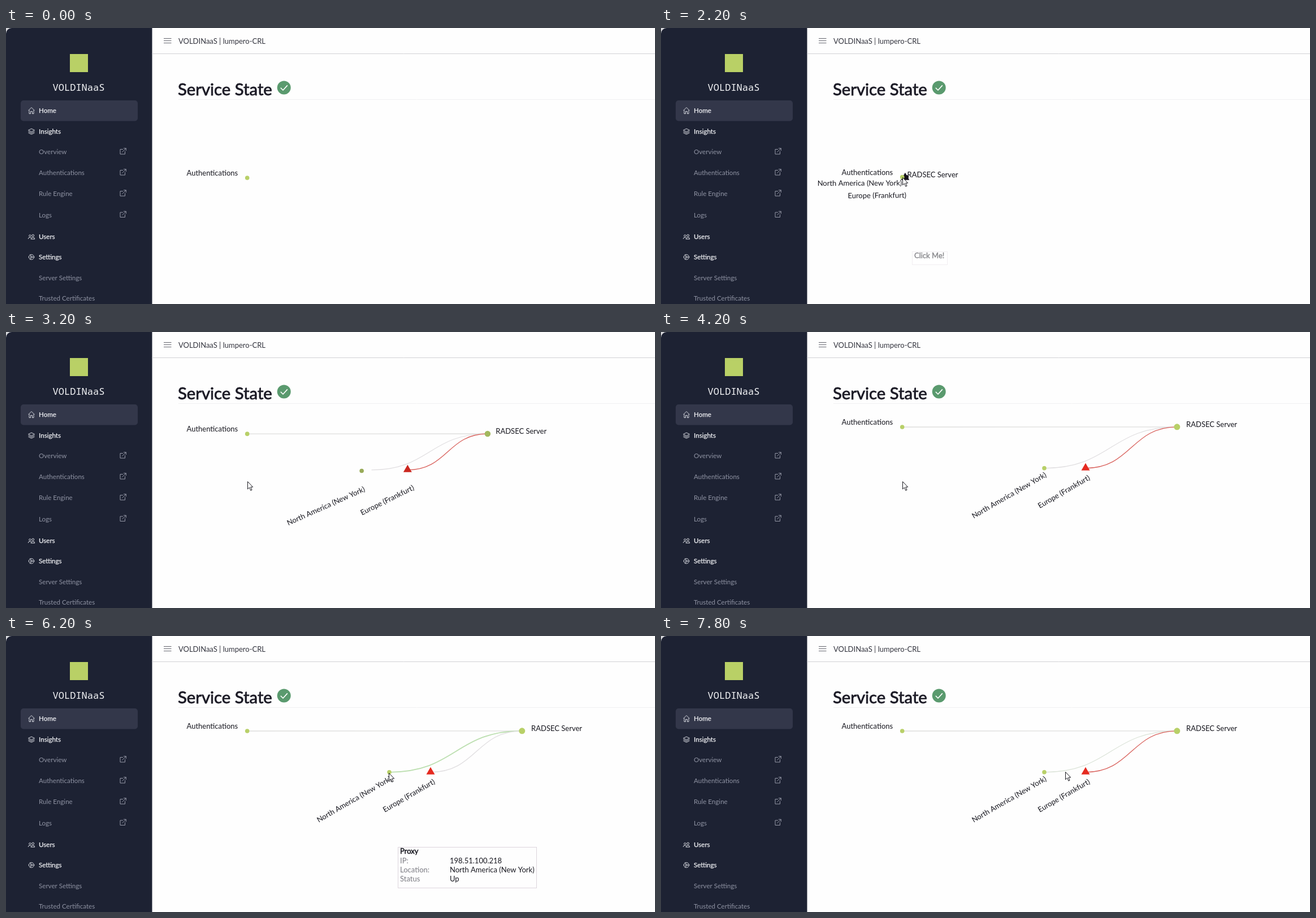
Recreate the animation shown at these times as an HTML page with a canvas. Size 1148 by 488 pixels, loop 8 s.

```html
<!DOCTYPE html>
<html lang="en">
<head>
<meta charset="utf-8">
<title>Service State</title>
<style>
html, body { margin: 0; width: 100%; height: 100%; overflow: hidden; background: #fefefe; }
canvas { display: block; }
</style>
</head>
<body>
<canvas id="stage" width="1148" height="488"></canvas>
<script>
const ctx = document.getElementById('stage').getContext('2d');
const LOOP = 8000, STEP = 200;
const LATO = 'Lato, sans-serif';
const GREEN = [184, 208, 104], RED = [229, 42, 32], INK = [20, 18, 28];
const GREY_LINK = '#e0dee0', RED_LINK = '#d9625d', GREEN_LINK = '#bcdfb0';

const clamp = v => Math.max(0, Math.min(1, v));
const mix = (a, b, p) => a + (b - a) * p;
const cubic = t => t < 0.5 ? 4 * t ** 3 : 1 - 4 * (1 - t) ** 3;
const tint = (a, b, p) => `rgb(${a.map((v, i) => Math.round(mix(v, b[i], p)))})`;

function track(keys, at) {
  let i = 1;
  while (i < keys.length - 1 && at > keys[i][0]) i++;
  const a = keys[i - 1], b = keys[i];
  const p = clamp((at - a[0]) / (b[0] - a[0]));
  return [mix(a[1], b[1], p), mix(a[2], b[2], p)];
}

function text(str, x, y, { size = 13, color = '#17171f', font = LATO, bold = 0, align = 'left' } = {}) {
  ctx.font = `${size}px ${font}`;
  ctx.textAlign = align;
  ctx.fillStyle = ctx.strokeStyle = color;
  ctx.fillText(str, x, y);
  if (bold) {
    ctx.lineWidth = bold;
    ctx.strokeText(str, x, y);
  }
}

function box(x, y, w, h, r, color) {
  ctx.fillStyle = color;
  ctx.beginPath();
  ctx.roundRect(x, y, w, h, r);
  ctx.fill();
}

function dot(x, y, r, color) {
  ctx.fillStyle = color;
  ctx.beginPath();
  ctx.arc(x, y, r, 0, Math.PI * 2);
  ctx.fill();
}

function stroke(d, color, width = 1, x = 0, y = 0) {
  ctx.save();
  ctx.translate(x, y);
  ctx.strokeStyle = color;
  ctx.lineWidth = width;
  ctx.lineJoin = 'round';
  ctx.stroke(new Path2D(d));
  ctx.restore();
}

const ICONS = {
  home: 'M-5.5 0L0 -5.5L5.5 0M-4 -1V5.5H-1.5V1.5H1.5V5.5H4V-1',
  layers: 'M0 -5L5.5 -2.3L0 .5L-5.5 -2.3ZM-5.5 0L0 2.8L5.5 0M-5.5 2.3L0 5L5.5 2.3',
  users: 'M-4.3 -1.6a1.7 1.7 0 1 1 3.4 0a1.7 1.7 0 1 1 -3.4 0M.8 -2a1.9 1.9 0 1 1 3.8 0a1.9 1.9 0 1 1 -3.8 0M-5.8 4Q-5.5 1.2 -2.6 1.2Q-1.2 1.2 -.5 2M-1 4.2Q-.8 1.3 2.6 1.3T5.8 4.2Z',
  gear: 'M-4.5 0a4.5 4.5 0 1 1 9 0a4.5 4.5 0 1 1 -9 0M-1.5 0a1.5 1.5 0 1 1 3 0a1.5 1.5 0 1 1 -3 0M1.5 0H5.5M-.8 -1.3L-2.7 -4.6M-.8 1.3L-2.7 4.6M-5.5 0H-4.5',
  external: 'M0 -3.5H-5V5H3.5V0M1 -5.3H5.3V-1M5.3 -5.3L-1.5 1.5'
};

const MENU = [
  ['Home', 146, 'home'], ['Insights', 183, 'layers'],
  ['Overview', 219], ['Authentications', 256], ['Rule Engine', 293], ['Logs', 330.5],
  ['Users', 369, 'users'], ['Settings', 405, 'gear'],
  ['Server Settings', 441.5], ['Trusted Certificates', 478]
];

function drawSidebar() {
  box(0, 0, 30, 30, 0, '#d8d9dd');
  box(0, 0, 258.5, 500, [10, 0, 0, 0], '#1d2233');
  box(113, 46, 32, 32, 0, '#b9d066');
  text('VOLDINaaS', 128.5, 110.5, { size: 17, color: '#f4f5f7', font: '"Noto Sans Mono", monospace', align: 'center' });
  box(26, 128, 207, 36.5, 5, '#33374a');
  for (const [label, y, icon] of MENU) {
    text(label, 58, y + 4, icon ? { size: 11.6, color: '#f1f2f5', bold: 0.25 } : { size: 11.6, color: '#8f93a3' });
    if (icon) stroke(ICONS[icon], '#d5d7de', 1, 45, y);
    else if (y < 340) stroke(ICONS.external, '#9699a8', 1, 207, y - 1);
  }
}

function drawHeader() {
  stroke('M279 18.5h13.5M279 22.5h13.5M279 26.5h13.5', '#666770');
  text('VOLDINaaS | lumpero-CRL', 305, 27.5, { color: '#34353f' });
  stroke('M258.5 45.5H1148', '#d2d2d5');
  stroke('M305 126.5H1148', '#f0f0f1');
  text('Service State', 304, 119, { size: 29.3, color: '#1d1c27', bold: 0.8 });
  dot(491.7, 105.5, 12, '#5a9a6e');
  stroke('M485.8 105.8l4.2 4.2l7.8 -8.6', '#fff', 1.6);
}

function link(from, to, color, width) {
  const mid = (from.x + to.x) / 2;
  stroke(`M${from.x} ${from.y}C${mid} ${from.y} ${mid} ${to.y} ${to.x} ${to.y}`, color, width);
}

function slanted(str, x, y, p) {
  ctx.save();
  ctx.translate(x, y);
  ctx.rotate(-Math.PI / 6 * p);
  text(str, 0, 4.5, { align: 'right' });
  ctx.restore();
}

// Label offsets from their nodes, keyed by expansion progress.
const NY_LABEL = [[0, -2, 9], [0.127, 0, 14], [0.805, 5, 31.5], [1, 2.5, 10.5]];
const EU_LABEL = [[0, 2, 31], [0.198, 4, 31], [0.874, 10.5, 30.5], [1, 6.5, 15.5]];

function drawTree(t) {
  const START = 1906, SPAN = 1890;
  const p = cubic(clamp((t - START) / SPAN));
  const late = cubic(clamp((t - START - 94) / SPAN));
  const spread = (x, y, q) => ({ x: mix(427, x, q), y: mix(265, y, q) });
  const root = { x: 426.7, y: mix(265, 168, p) };

  if (t > START) {
    const server = spread(912.8, 167.8, p);
    const ny = spread(678, 240.8, late), eu = spread(751, 240.8, p);
    const hover = t >= 5400 && t < 7800;
    link(root, server, '#dededd', 1.3);
    link(spread(678, 240.8, p), server, hover ? GREEN_LINK : t >= 7800 ? '#dbe3d8' : GREY_LINK, hover ? 1.8 : 1.2);
    link(eu, server, hover ? GREY_LINK : RED_LINK, 1.3);

    dot(server.x, server.y, 3.6 + 1.9 * p, tint(INK, GREEN, p));
    text('RADSEC Server', server.x + 1 + 15.3 * p, server.y);

    dot(ny.x, ny.y, 3.8, tint(INK, GREEN, late));
    const [nx, nyOff] = track(NY_LABEL, late);
    slanted('North America (New York)', ny.x + nx, ny.y + nyOff, late);

    ctx.fillStyle = tint(INK, RED, p);
    ctx.fill(new Path2D(`M${eu.x} ${eu.y - 9}l7.5 13h-15Z`));
    const [ex, ey] = track(EU_LABEL, p);
    slanted('Europe (Frankfurt)', eu.x + ex, eu.y + ey, p);
  }
  dot(root.x, root.y, 3.8, `rgb(${GREEN})`);
  text('Authentications', 319.5, root.y - 4);
}

function tooltip(x, y, w, h, rows, alpha = 1) {
  ctx.save();
  ctx.globalAlpha = alpha;
  ctx.translate(x, y);
  box(0, 0, w, h, 0, '#fefefe');
  ctx.strokeStyle = '#ddd5dd';
  ctx.lineWidth = 1;
  ctx.strokeRect(0.5, 0.5, w - 1, h - 1);
  rows.forEach(([key, value], i) => {
    const line = 12.3 + i * 16.3;
    text(key, 4, line, i ? { color: '#7b7b82' } : { bold: 0.5 });
    if (value) text(value, 92, line);
  });
  ctx.restore();
}

const PROXY = [['Proxy'], ['IP:', '198.51.100.218'], ['Location:', 'North America (New York)'], ['Status', 'Up']];

function pointer(t) {
  if (t < 1600) return [424, 264];
  if (t < 5400) {
    const q = cubic(clamp((t - 4600) / 800));
    return [mix(427, 679, q), mix(264, 242, q)];
  }
  return t < 7800 ? [677, 242] : [715, 240];
}

function drawCursor(x, y) {
  const arrow = new Path2D('M.5 .5V13.8L3.6 10.9L5.8 16.2L8 15.2L5.8 10.1H9.7Z');
  ctx.save();
  ctx.translate(x, y);
  ctx.fillStyle = '#fff';
  ctx.fill(arrow);
  ctx.strokeStyle = '#1a1a20';
  ctx.lineWidth = 1;
  ctx.stroke(arrow);
  ctx.restore();
}

function draw(t) {
  ctx.fillStyle = '#fefefe';
  ctx.fillRect(0, 0, 1148, 488);
  drawSidebar();
  drawHeader();
  drawTree(t);
  const [x, y] = pointer(t);
  if (t >= 200 && t < 2400) tooltip(x + 17, y + 131, 63, 24, [['Click Me!']], 1 - clamp((t - 1900) / 500));
  if (t >= 5400 && t < 7800) tooltip(x + 16, y + 131, 246, 73, PROXY);
  if (t >= 200) drawCursor(x, y);
}

function frame() {
  const t = performance.now() % LOOP;
  draw(Math.floor(t / STEP) * STEP);
  requestAnimationFrame(frame);
}
frame();
</script>
</body>
</html>
```
